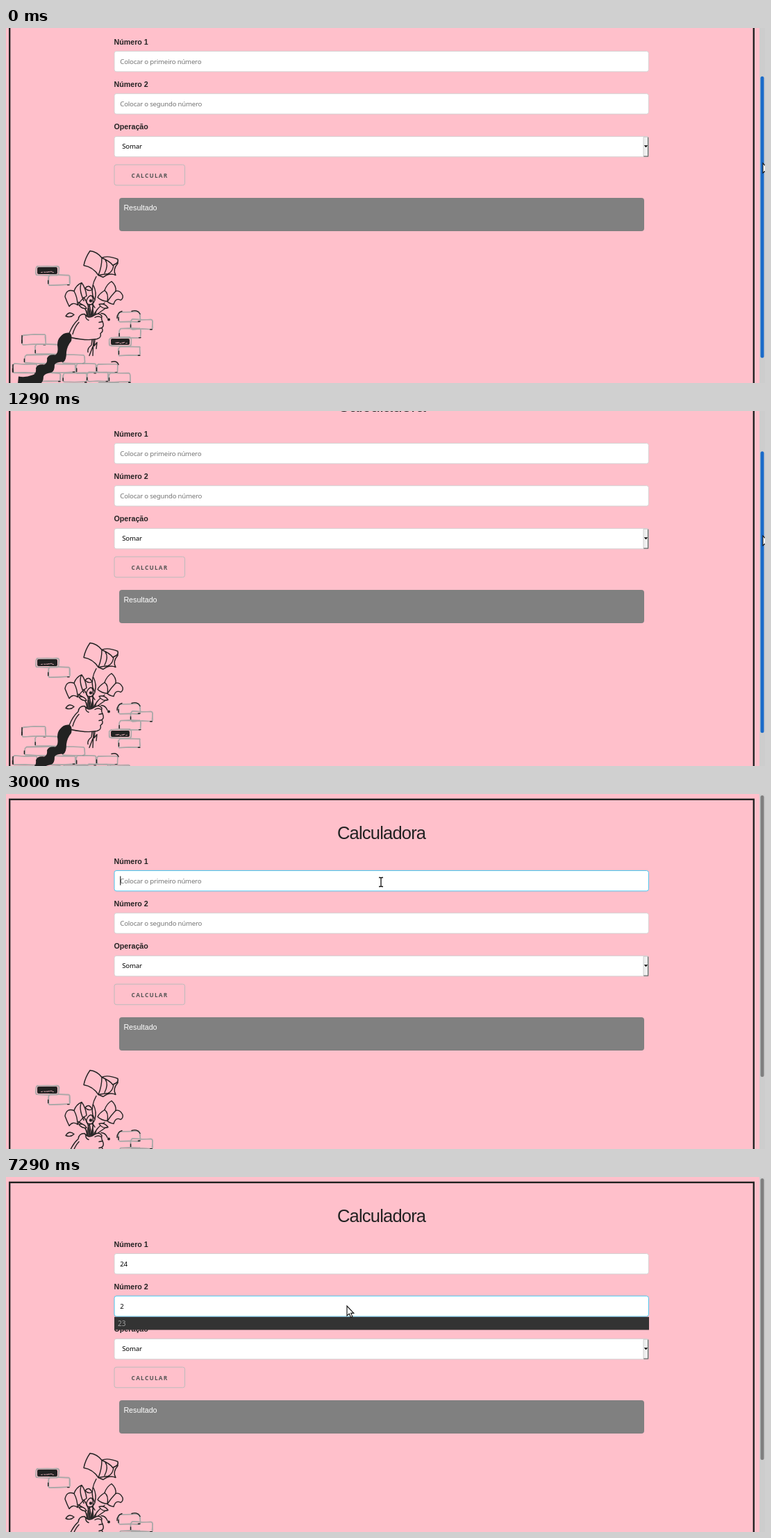
An HTML page that plays this animation: 1093 by 512 pixels, repeating every 8000 ms.

```html
<!DOCTYPE html>
<html lang="pt">
<head>
<meta charset="utf-8">
<title>Calculadora</title>
<style>
html, body { margin: 0; width: 100%; height: 100%; overflow: hidden; background: #ffc0cb; }
svg { display: block; }
text { white-space: pre; }
.head { font: 25.5px "Liberation Sans", sans-serif; letter-spacing: -.8px; fill: #222; text-anchor: middle; }
.label { font: bold 10.7px "Liberation Sans", sans-serif; fill: #222; }
.result { font: 10.7px "Liberation Sans", sans-serif; fill: #fff; }
.field { font: 9.6px "Noto Sans", sans-serif; letter-spacing: -.2px; fill: #000; }
.hint { fill: #757575; }
.button { font: bold 8.3px "Noto Sans", sans-serif; letter-spacing: 1.25px; fill: #555; }
.option { font: 10px "Noto Sans", sans-serif; fill: #a0a0a0; }
.ink { fill: none; stroke: #222; stroke-width: 1.4; stroke-linecap: round; stroke-linejoin: round; }
.leaf { fill: #ffc0cb; }
.chalk { fill: none; stroke: #aaa8a8; stroke-linecap: round; stroke-linejoin: round; }
</style>
</head>
<body>
<svg width="1093" height="512" viewBox="0 0 1093 512">
  <rect width="1093" height="512" fill="#ffc0cb"/>
  <g id="page">
    <g id="art" transform="translate(0 115.5)"></g>
    <rect x="5.2" y="7.8" width="1071.6" height="612" fill="none" stroke="#222" stroke-width="2.4"/>
    <text class="head" x="540.6" y="64.8">Calculadora</text>
    <g id="form"></g>
    <rect x="163" y="322" width="756" height="48" rx="4" fill="#808080"/>
    <text class="result" x="169.4" y="339.8">Resultado</text>
    <g id="popup">
      <rect x="156" y="201.8" width="770" height="18.7" fill="#333"/>
      <text class="option" x="161" y="215.3">23</text>
    </g>
  </g>
  <rect x="1085" width="8" height="512" fill="#cdcdcd"/>
  <rect id="thumb" x="1086.5" width="5" height="406" rx="2.5"/>
  <path id="arrow" d="M0 0V14L3.3 11.2 5.6 16.4 7.9 15.3 5.7 10.4H9.8Z" fill="#fff" stroke="#111" stroke-width="1.1"/>
  <g id="beam" fill="none">
    <path id="stem" d="M-3-6.5H-1Q0-6.5 0-5.5Q0-6.5 1-6.5H3M0-5.5V5.5M-3 6.5H-1Q0 6.5 0 5.5Q0 6.5 1 6.5H3" stroke="#fff" stroke-width="3"/>
    <path d="M-3-6.5H-1Q0-6.5 0-5.5Q0-6.5 1-6.5H3M0-5.5V5.5M-3 6.5H-1Q0 6.5 0 5.5Q0 6.5 1 6.5H3" stroke="#111" stroke-width="1.3"/>
  </g>
</svg>
<script>
const LOOP = 8000, STEP = 1000 / 7, MAX_SCROLL = 115.5;
const $ = id => document.getElementById(id);

// Form
const label = (y, s) => `<text class="label" x="155.5" y="${y}">${s}</text>`;
const box = (y, id) => `<rect id="${id}" x="156" y="${y}" width="769.4" height="29.4" rx="3" fill="#fff" stroke="#d1d1d1" stroke-width=".9"/>`;
const input = (y, n) => box(y, "box" + n) +
  `<text id="text" class="field"></text>`.replace('id="text"', `id="text${n}" x="164.3" y="${y + 18}"`) +
  `<rect id="caret${n}" y="${y + 8}" width="1" height="13" fill="#000"/>`;
$("form").innerHTML =
  label(100.7, "Número 1") + input(110.5, 1) +
  label(161.6, "Número 2") + input(171.7, 2) +
  label(223.2, "Operação") + box(233.4, "select") +
  `<text class="field" x="167.3" y="251.2">Somar</text>
  <rect x="918" y="234" width="7" height="28.5" rx="1" fill="#efefef"/>
  <path d="M918 262V234.2H924" fill="none" stroke="#c4c4c4" stroke-width=".8"/>
  <path d="M924.6 234.5V262.2H918.3" fill="none" stroke="#666" stroke-width="1.2"/>
  <path d="M918.8 246.3h5.4l-2.7 3z" fill="#000"/>
  <rect x="156" y="274.2" width="101.5" height="29.6" rx="3" fill="none" stroke="#bbb"/>
  <text class="button" x="180.6" y="292.9">CALCULAR</text>`;

// Illustration
let seed = 7;
const rnd = a => (seed = seed * 16807 % 2147483647, (seed / 2147483647 - .5) * 2 * a);

function brick(x, y, w, h, dark) {
  const p = (px, py) => `${(px + rnd(.7)).toFixed(1)} ${(py + rnd(.7)).toFixed(1)}`;
  const loop = () => `M${p(x + 2, y)}L${p(x + w / 2, y)} ${p(x + w - 2, y)}Q${p(x + w, y)} ${p(x + w, y + 3)}` +
    `L${p(x + w, y + h - 2)}Q${p(x + w, y + h)} ${p(x + w - 3, y + h)}L${p(x + w / 2, y + h)} ${p(x + 2, y + h)}` +
    `Q${p(x, y + h)} ${p(x, y + h - 3)}L${p(x, y + 3)}Z`;
  let s = "";
  if (dark) {
    s += `<rect x="${x + 2}" y="${y + 1.5}" width="${w - 4}" height="${h - 3}" rx="2" fill="#222"/>`;
    for (let i = 0; i < 6; i++)
      s += `<path d="M${p(x + 8 + i * 3, y + h * .65)}l${3 + rnd(1)} ${rnd(.6)}" stroke="#ffc0cb" stroke-width=".8"/>`;
  }
  s += `<path class="chalk" stroke-width="1.6" d="${loop()}"/><path class="chalk" stroke-width=".9" d="${loop()}"/>`;
  if (!dark) s += `<path class="ink" d="M${p(x, y + h - 6)}V${y + h - 2}M${p(x + w - 3, y + h)}h2.5"/>`;
  return s;
}

const bricks = [
  [43, 305, 33, 13, 1], [61, 318, 31, 14], [162, 371, 31, 14], [180, 382, 31, 14],
  [163, 395, 31, 13], [149, 408, 31, 12, 1], [162, 421, 31, 13],
  [23, 404, 34, 14], [42, 418, 37, 14], [27, 433, 44, 12], [82, 433, 31, 12],
  [10, 446, 35, 13], [65, 446, 35, 12], [101, 446, 29, 13], [131, 446, 30, 12],
  [41, 459, 37, 12], [82, 459, 34, 13], [117, 458, 30, 13], [148, 459, 31, 13], [132, 473, 30, 12]
];
const ink = (d, c = "") => `<path class="ink ${c}" d="${d}"/>`;
$("art").innerHTML = bricks.map(b => brick(...b)).join("") +
  ink("M160 380Q160 372 167 370M181 370Q189 367 193 374M23 415V405M10 458V447M152 443Q160 441 162 447") +
  // Open book
  ink("M121 283Q114 293 112 304Q125 306 133 318Q138 306 138 293Q131 284 121 283Z") +
  ink("M138 293Q146 289 161 295Q163 300 155 303Q154 313 147 316Q139 317 133 318M161 295L161 301Q153 310 158 318Q149 314 140 321L133 318M138 293Q150 298 154 304M143 296Q148 303 142 315") +
  // Stems and blossoms
  ink("M130 320Q122 334 125 348Q126 360 124 376M126 333Q131 343 128 353M117 376Q115 362 104 357M121 376Q120 361 112 350M126 376Q132 364 142 358M129 376Q137 370 143 366") +
  ink("M98 341Q87 337 85 349Q88 357 91 363Q96 356 103 361Q103 350 98 341Z", "leaf") +
  ink("M98 341Q101 332 109 329Q115 337 116 348Q109 352 103 361M109 329Q104 337 112 355") +
  ink("M142 340Q145 331 152 327Q159 333 158 341Q152 347 146 356Q137 355 132 350Q134 345 142 340Z", "leaf") +
  ink("M158 341Q164 339 168 347Q169 352 165 354Q158 350 155 360Q149 359 146 356M142 340Q148 344 146 356") +
  ink("M114 337Q119 330 124 339Q119 342 114 337ZM86 377Q91 369 98 375Q93 380 86 377ZM134 360Q142 358 147 365Q139 368 134 360ZM105 361Q112 359 116 366Q109 367 105 361Z", "leaf") +
  ink("M117 352Q123 342 128 354Q125 362 118 360Q114 357 117 352ZM119 363Q123 356 128 365M137 373Q143 373 146 380M120 360L123 376") +
  `<g fill="#222"><circle cx="122" cy="355" r="2.2"/><circle cx="148" cy="382" r="2"/><circle cx="125" cy="349" r="1.5"/>
  <path d="M115 378L118 362 122 375 125 361 127 376 131 366 129 379 123 381Z" opacity=".85"/></g>` +
  // Hand, tied stems, sleeve
  ink("M91 402Q96 389 104 382Q105 374 113 374Q119 382 127 376Q134 371 138 377Q137 382 139 385Q142 391 138 394Q141 399 136 402Q138 408 131 410Q116 413 94 408", "leaf") +
  ink("M115 376Q114 381 119 383M128 379Q133 376 137 379M134 386L139 385M134 395L138 394M96 403Q99 392 105 386") +
  ink("M124 411L123 419Q117 423 118 429M126 411L125 434M128 411L127 420L131 415L130 424M120 434L125 421") +
  `<path d="M78 407Q83 400 91 401Q96 403 94 413Q88 420 87 429Q87 440 83 443Q72 443 70 447Q70 456 66 458Q55 460 54 464Q54 472 49 475Q34 478 17 475L18 464Q28 466 38 462Q44 461 43 452Q45 446 55 447Q60 445 59 438Q61 432 71 433Q76 430 74 419Q74 411 78 407Z" fill="#222"/>`;

// Tracks are [step, values...], linear between keys
function track(keys, k) {
  let i = keys.findIndex(q => q[0] > k);
  if (i < 0) i = keys.length;
  const a = keys[i - 1], b = keys[i] || a;
  const u = b === a ? 0 : (k - a[0]) / (b[0] - a[0]);
  return a.slice(1).map((v, j) => v + (b[j + 1] - v) * u);
}
const scrollKeys = [[0, 77], [3, 77], [4, MAX_SCROLL], [5, MAX_SCROLL], [9, 64], [11, 26.5], [13, 0]];
const mouseKeys = [[0, 1090, 195], [3, 1090, 195], [4, 1090, 245], [9, 1090, 180], [11, 1090, 145],
  [13, 1092, 114], [14, 1058, 117], [19, 540, 127], [35, 540, 127], [40, 491, 186]];

const set = (id, attrs) => { for (const n in attrs) $(id).setAttribute(n, attrs[n]); };
const show = (id, on) => set(id, { visibility: on ? "visible" : "hidden" });

function field(n, value, hint, focus, caret) {
  const el = $("text" + n);
  el.textContent = value || hint;
  el.setAttribute("class", value ? "field" : "field hint");
  set("box" + n, { stroke: ["#d1d1d1", "#82cae1", "#33c3f0"][focus] });
  set("caret" + n, { x: 164.3 + value.length * 5.6 });
  show("caret" + n, caret);
}

function draw(t) {
  const k = Math.floor((t + 6) / STEP);
  const [scroll] = track(scrollKeys, k);
  const [x, y] = track(mouseKeys, k);
  set("page", { transform: `translate(0 ${-scroll})` });
  set("thumb", { y: 2 + scroll * .88, fill: k < 14 ? "#1a6bc9" : "#7f7f7f" });

  const first = k >= 20 && k < 41, second = k >= 41;
  field(1, k >= 31 ? "24" : "", "Colocar o primeiro número", first ? (k > 20 ? 2 : 1) : 0, first);
  field(2, k >= 50 ? "2" : "", "Colocar o segundo número", second ? (k > 41 ? 2 : 1) : 0, second && k < 51);

  show("popup", k >= 50);
  set("popup", k === 50 ? { opacity: .5, transform: "translate(0 4)" } : { opacity: 1, transform: "" });

  const overInput = scroll === 0 && x < 926 && (y < 141 || y > 171) && k < 50;
  const at = { transform: `translate(${x} ${y})` };
  set("arrow", at);
  set("beam", at);
  show("arrow", !overInput);
  show("beam", overInput);
}

const start = performance.now();
function tick() {
  draw((performance.now() - start) % LOOP);
  requestAnimationFrame(tick);
}
tick();
</script>
</body>
</html>
```
